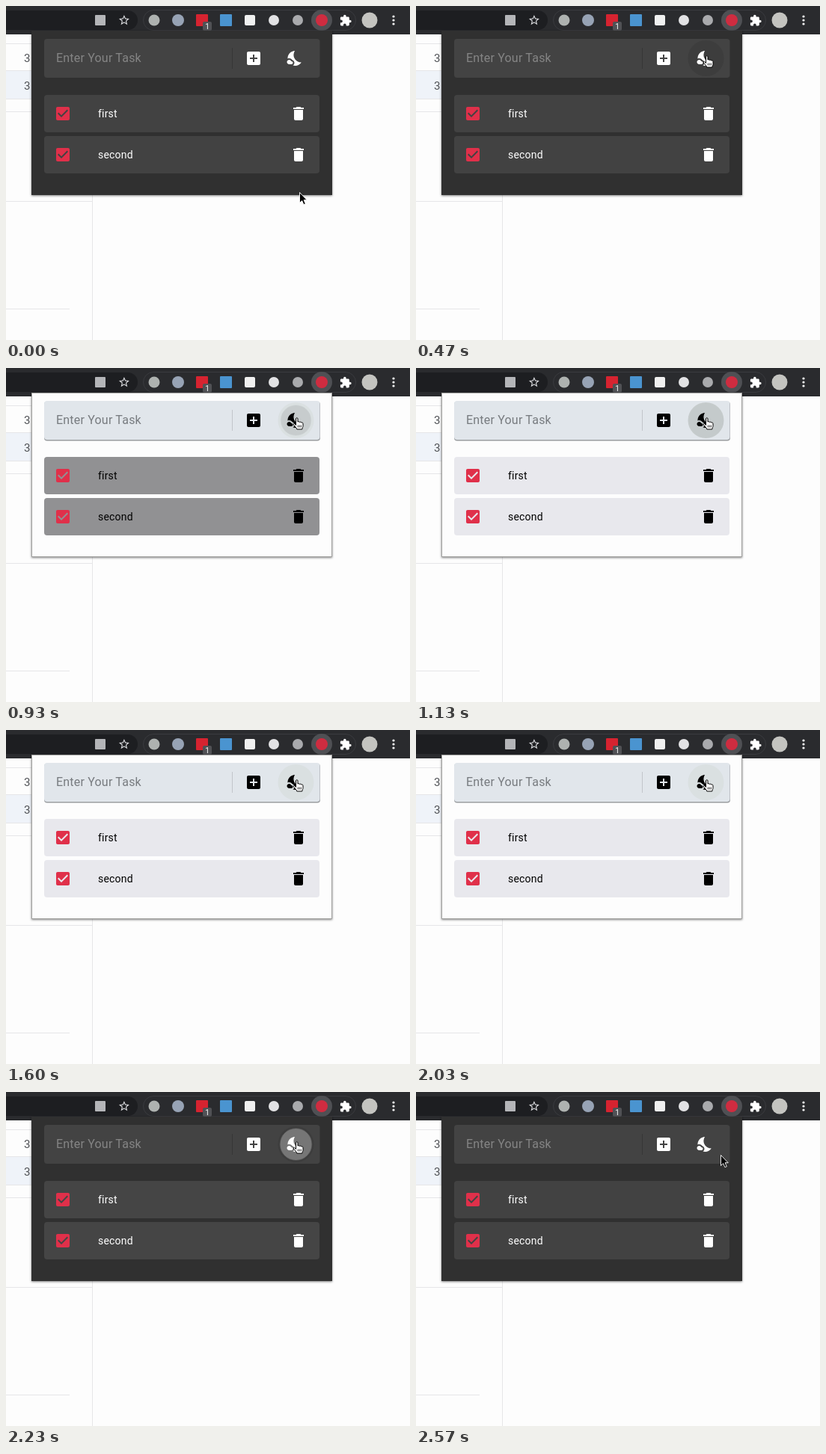
Write an HTML page that moves like this. It is 540 px wide and 447 px high and loops after 2.61 s.

```html
<!DOCTYPE html>
<html lang="en">
<head>
<meta charset="utf-8">
<title>Task list theme toggle</title>
<style>
html, body { margin: 0; width: 100%; height: 100%; overflow: hidden; background: #fdfdfd; }
svg { display: block; width: 540px; height: 447px; font-family: Roboto, "Open Sans", sans-serif; }
.loop { animation: 2610ms linear infinite; }

/* Theme flips hard; only the task cards fade. */
.popup { animation-name: theme; animation-timing-function: step-end; }
@keyframes theme {
  0%, 78.54%, 100% {
    --panel: #303030; --edge: #303030; --field: #434343; --lift: transparent;
    --hint: #858585; --rule: #363636; --ink: #fff; --hover: #3d3d3d; --ripple: #fff;
  }
  31.7% {
    --panel: #fdfdfd; --edge: #a2a2a0; --field: #e1e6eb; --lift: #9a9da0;
    --hint: #777b7f; --rule: #c2c6ca; --ink: #000; --hover: #dae0e1; --ripple: rgba(0,0,0,.33);
  }
}
.panel { fill: var(--panel); stroke: var(--edge); filter: drop-shadow(0 1px 1.5px rgba(0,0,0,.5)); }
.field { fill: var(--field); }
.lift { fill: var(--lift); }
.rule { fill: var(--rule); }
.hint { fill: var(--hint); font-size: 16px; letter-spacing: .2px; }
.ink { fill: var(--ink); }
.task { font-size: 14px; letter-spacing: .2px; }
.check { fill: #e0304a; }

.card { animation-name: card; }
@keyframes card {
  0%, 86.97%, 100% { fill: #424242; }
  31.8% { fill: #424242; animation-timing-function: cubic-bezier(.4,0,.2,1); }
  43.2% { fill: #e8e8ed; }
  78.54% { fill: #e8e8ed; animation-timing-function: cubic-bezier(0,0,.2,1); }
}

.hover { fill: var(--hover); animation-name: hover; }
@keyframes hover {
  0%, 15.7%, 96.6%, 100% { opacity: 0; }
  18%, 94.6% { opacity: 1; }
}

.ripple { fill: var(--ripple); transform-origin: 387.5px 70px; animation-name: ripple; }
@keyframes ripple {
  0% { transform: scale(0); opacity: .1; }
  24.14% { transform: scale(0); opacity: .1; animation-timing-function: cubic-bezier(.4,0,.2,1); }
  44.5% { transform: scale(1); opacity: .3; }
  53.6% { transform: scale(1); opacity: 0; }
  53.7% { transform: scale(0); opacity: 0; }
  77.78% { transform: scale(0); opacity: .3; animation-timing-function: cubic-bezier(0,0,.2,1); }
  91.2% { transform: scale(1); opacity: .3; }
  95.8%, 100% { transform: scale(1); opacity: 0; }
}

.cursor { animation-name: travel; }
@keyframes travel {
  0% { transform: translate(392px, 249px); }
  2.68% { transform: translate(392px, 249px); animation-timing-function: ease-in; }
  9.6% { transform: translate(402px, 160px); animation-timing-function: ease-out; }
  18%, 92% { transform: translate(389px, 67px); animation-timing-function: ease-in-out; }
  96.9%, 100% { transform: translate(407px, 84px); }
}
.arrow { animation-name: arrow; animation-timing-function: step-end; }
.hand { animation-name: hand; animation-timing-function: step-end; }
@keyframes arrow { 0%, 95.4%, 100% { opacity: 1; } 15.6% { opacity: 0; } }
@keyframes hand { 0%, 95.4%, 100% { opacity: 0; } 15.6% { opacity: 1; } }
</style>
</head>
<body>
<svg viewBox="0 0 540 447">
  <defs>
    <path id="box" d="M19 3H5c-1.11 0-2 .9-2 2v14c0 1.1.89 2 2 2h14c1.11 0 2-.9 2-2V5c0-1.1-.89-2-2-2zm-9 14l-5-5 1.41-1.41L10 14.17l7.59-7.59L19 8l-9 9z"/>
    <path id="bin" d="M6 19c0 1.1.9 2 2 2h8c1.1 0 2-.9 2-2V7H6v12zM19 4h-3.5l-1-1h-5l-1 1H5v2h14V4z"/>
    <path id="add" d="M19 3H5c-1.11 0-2 .9-2 2v14c0 1.1.89 2 2 2h14c1.1 0 2-.9 2-2V5c0-1.1-.9-2-2-2zm-2 10h-4v4h-2v-4H7v-2h4V7h2v4h4v2z"/>
    <path id="night" d="M11.1 12.08c-2.33-4.51-.5-8.48.53-10.07C6.27 2.2 1.98 6.59 1.98 12c0 .14.02.28.02.42.62-.27 1.29-.42 2-.42 1.66 0 3.18.83 4.1 2.15 1.67.48 2.9 2.02 2.9 3.85 0 1.52-.87 2.83-2.12 3.51.98.32 2.03.5 3.11.5 3.5 0 6.58-1.8 8.37-4.52-2.36.23-6.98-.97-9.26-5.41zM7 16h-.18C6.4 14.84 5.3 14 4 14c-1.66 0-3 1.34-3 3s1.34 3 3 3h3c1.1 0 2-.9 2-2s-.9-2-2-2z"/>
    <path id="star" d="M22 9.24l-7.19-.62L12 2 9.19 8.63 2 9.24l5.46 4.73L5.82 21 12 17.27 18.18 21l-1.63-7.03L22 9.24zM12 15.4l-3.76 2.27 1-4.28-3.32-2.88 4.38-.38L12 6.1l1.71 4.04 4.38.38-3.32 2.88 1 4.28L12 15.4z"/>
    <path id="puzzle" d="M20.5 11H19V7c0-1.1-.9-2-2-2h-4V3.5C13 2.12 11.88 1 10.5 1S8 2.12 8 3.5V5H4c-1.1 0-1.99.9-1.99 2v3.8H3.5c1.49 0 2.7 1.21 2.7 2.7s-1.21 2.7-2.7 2.7H2V20c0 1.1.9 2 2 2h3.8v-1.5c0-1.49 1.21-2.7 2.7-2.7 1.49 0 2.7 1.21 2.7 2.7V22H17c1.1 0 2-.9 2-2v-4h1.5c1.38 0 2.5-1.12 2.5-2.5S21.88 11 20.5 11z"/>
  </defs>

  <!-- page -->
  <rect width="540" height="447" fill="#fdfdfd"/>
  <rect y="87" width="36" height="37" fill="#eff3f9"/>
  <path d="M0 50.5H36M0 86.5H36M0 124.5H36M0 141.5H36M0 261.5H115M0 405.5H85M115.5 252V447" stroke="#e6e6e8" fill="none"/>
  <g fill="#505256" font-size="15"><text x="24" y="74.500">3</text><text x="24" y="111.500">3</text></g>

  <!-- browser bar -->
  <rect width="540" height="38" fill="#2a2b2e"/>
  <rect x="-20" y="6" width="196" height="26" rx="13" fill="#1d1e21"/>
  <rect x="183.500" y="5.500" width="284" height="27" rx="13.500" fill="none" stroke="#3a3b3f"/>
  <rect x="119" y="12" width="14" height="14" rx="1" fill="#b4b5b8"/>
  <use href="#star" transform="translate(149.500 10.500) scale(.7)" fill="#dcdde0"/>
  <circle cx="198" cy="19" r="7.500" fill="#aeb2b0"/>
  <circle cx="230" cy="19" r="8" fill="#97a3b5"/>
  <rect x="254" y="11" width="16" height="16" rx="1" fill="#d62330"/>
  <rect x="263" y="21" width="12" height="12" rx="2" fill="#505155"/>
  <text x="269" y="31" font-size="10" fill="#fff" text-anchor="middle">1</text>
  <rect x="286" y="11" width="16" height="16" rx="1" fill="#4a94d0"/>
  <rect x="319" y="12" width="14" height="14" rx="2" fill="#f0f0f0"/>
  <circle cx="358" cy="19" r="7" fill="#e2e2e4"/>
  <circle cx="390" cy="19" r="7" fill="#a9aaad"/>
  <circle cx="422" cy="19" r="14" fill="#4f5054"/>
  <circle cx="422" cy="19" r="8" fill="#cf2c40"/>
  <use href="#puzzle" transform="translate(445.500 11) scale(.7)" fill="#fff"/>
  <circle cx="486" cy="19" r="10.500" fill="#c4c4c0"/>
  <g fill="#fff"><circle cx="518" cy="14" r="1.600"/><circle cx="518" cy="19" r="1.600"/><circle cx="518" cy="24" r="1.600"/></g>

  <!-- extension popup -->
  <g class="popup loop">
    <rect class="panel" x="34.500" y="33.500" width="401" height="219"/>
    <rect class="lift" x="51" y="45" width="369" height="52.500" rx="4"/>
    <rect class="field" x="51" y="44" width="368.500" height="52" rx="4"/>
    <text class="hint" x="67" y="75">Enter Your Task</text>
    <rect class="rule" x="302" y="56" width="1" height="28"/>
    <use class="ink" href="#add" x="319" y="58"/>
    <circle class="hover loop" cx="387.500" cy="70" r="24"/>
    <circle class="ripple loop" cx="387.500" cy="70" r="24"/>
    <use class="ink" href="#night" x="374.500" y="58"/>

    <rect class="card loop" x="51" y="119" width="368" height="50" rx="4"/>
    <use class="check" href="#box" x="64" y="132"/>
    <text class="task ink" x="123" y="149">first</text>
    <use class="ink" href="#bin" x="379" y="132"/>

    <rect class="card loop" x="51" y="174" width="368" height="50" rx="4"/>
    <use class="check" href="#box" x="64" y="187"/>
    <text class="task ink" x="123" y="204">second</text>
    <use class="ink" href="#bin" x="379" y="187"/>
  </g>

  <g class="cursor loop">
    <path class="arrow loop" d="M.5 .5V14.500L3.700 11.600 5.900 16.700 8.300 15.700 6.100 10.700H10.200Z" fill="#000" stroke="#fff" stroke-width=".9"/>
    <g class="hand loop">
      <path d="M-1.500 9.500V.9C-1.500-.7 1-.7 1 .9V5.200C1.400 4.300 3.200 4.400 3.400 5.600 4 4.800 5.600 5 5.800 6.200 6.500 5.600 8 6 8 7.400V10.500C8 12.300 7 13 6.800 15H-.2C-.6 13-3.200 11.200-4.500 8.800-5 7.600-3.700 6.900-2.900 7.800Z" fill="#fff" stroke="#000" stroke-linejoin="round"/>
      <path d="M1.300 9.500V12.500M3.300 9.500V12.500M5.300 9.500V12.500" stroke="#000" stroke-width=".8"/>
    </g>
  </g>
</svg>
</body>
</html>
```
